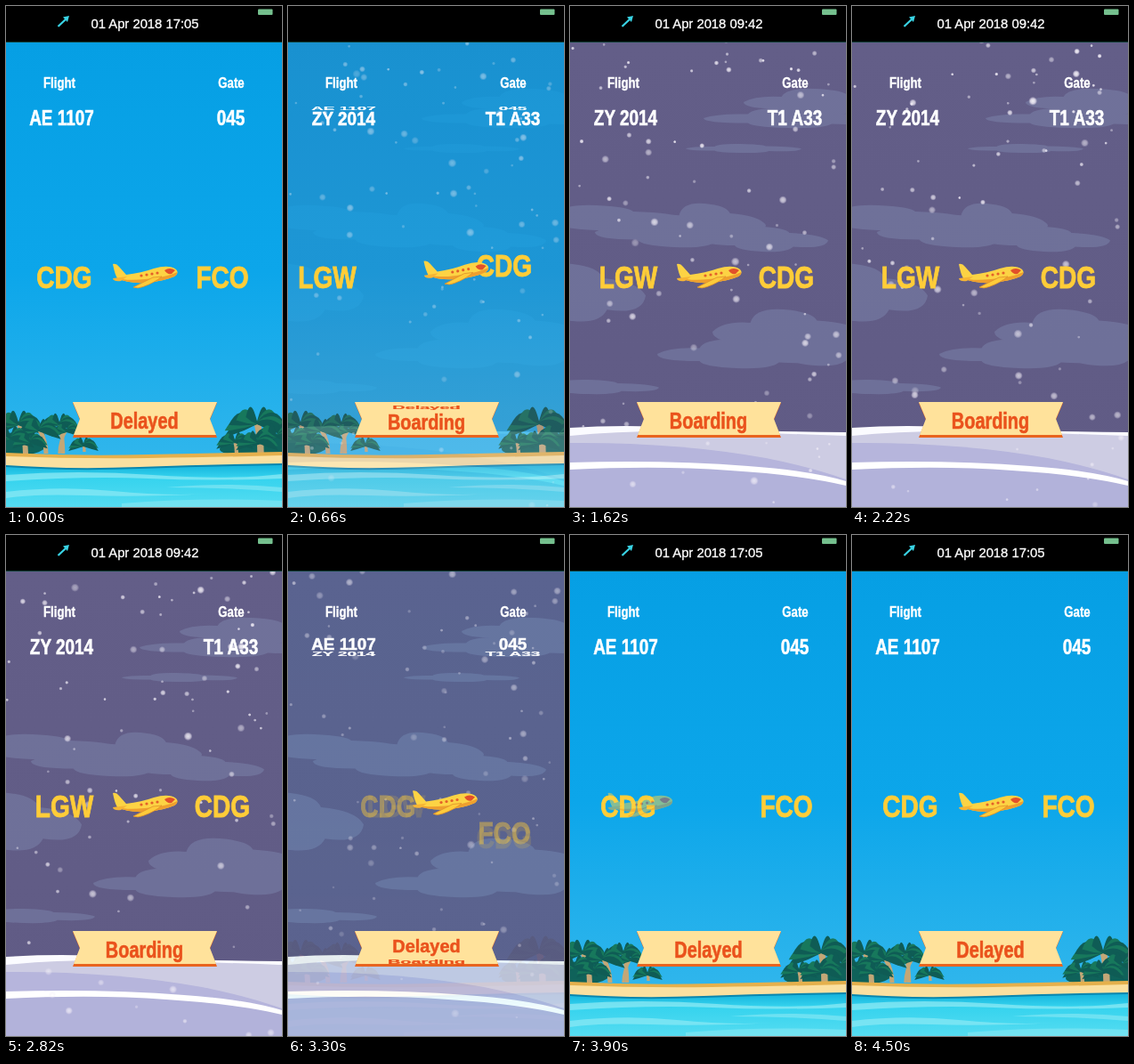
These frames come from a looping animation (310x563 px, 4560 ms). An HTML page:

```html
<!DOCTYPE html>
<html lang="en">
<head>
<meta charset="utf-8">
<title>Flight board</title>
<style>
  html, body { margin: 0; width: 100%; height: 100%; overflow: hidden; background: #000; }
  svg { display: block; width: 100%; height: 100%; }
  text { font-family: "Liberation Sans", Arial, sans-serif; font-weight: bold; text-anchor: middle; }
  .date text { font-size: 14.8px; font-weight: normal; fill: #fff; stroke: #fff; stroke-width: .35; }
</style>
</head>
<body>
<svg viewBox="0 0 310 563" preserveAspectRatio="none">
  <defs>
    <linearGradient id="day" x1="0" y1="0" x2="0" y2="1">
      <stop offset="0" stop-color="#069fe4"/>
      <stop offset=".55" stop-color="#0ca6ea"/>
      <stop offset="1" stop-color="#30b6ec"/>
    </linearGradient>
    <linearGradient id="dusk" x1="0" y1="0" x2="0" y2="1">
      <stop offset="0" stop-color="#635e88"/>
      <stop offset="1" stop-color="#605b85"/>
    </linearGradient>
    <linearGradient id="sea" x1="0" y1="0" x2="0" y2="1">
      <stop offset="0" stop-color="#15b4dd"/>
      <stop offset=".3" stop-color="#35d3ee"/>
      <stop offset="1" stop-color="#55dcf1"/>
    </linearGradient>
    <radialGradient id="flake">
      <stop offset="0" stop-color="#fff"/>
      <stop offset=".55" stop-color="#f4eef8" stop-opacity=".85"/>
      <stop offset="1" stop-color="#e8e4f4" stop-opacity="0"/>
    </radialGradient>
  </defs>

  <g id="beach">
    <rect y="40" width="310" height="470" fill="url(#day)"/>
    <g id="palms"></g>
    <path d="M0 502 Q80 506 160 504 T310 501 V525 H0Z" fill="#e5b04c"/>
    <path d="M0 506 Q80 509 160 508 T310 505 V525 H0Z" fill="#fbe0a0"/>
    <path d="M0 516 Q70 521 150 518 T310 514 V563 H0Z" fill="#0a86ae"/>
    <path d="M0 518 Q70 523 150 520 T310 516 V563 H0Z" fill="url(#sea)"/>
    <path d="M0 527 Q80 521 165 527 T310 526 V531 Q230 534 160 531 T0 534Z" fill="#8deaf5" opacity=".75"/>
    <path d="M0 546 Q60 539 120 545 T230 548 Q150 552 90 550 T0 553Z" fill="#8deaf5" opacity=".7"/>
    <path d="M180 541 Q250 535 310 541 V546 Q250 541 180 541Z" fill="#8deaf5" opacity=".6"/>
    <path d="M130 559 Q220 552 310 556 V563 H130Z" fill="#8deaf5" opacity=".55"/>
  </g>

  <g id="winter">
    <rect y="40" width="310" height="523" fill="url(#dusk)"/>
    <g id="clouds" fill="#8795bb" opacity=".36"></g>
    <path d="M0 474 Q60 470 130 474 T310 479 V563 H0Z" fill="#fbfbff"/>
    <path d="M0 483 Q50 478 110 478 T310 483 V563 H0Z" fill="#cdcce3"/>
    <path d="M0 491 Q120 490 220 508 Q270 518 310 532 V563 H0Z" fill="#b6b5dc"/>
    <path d="M0 513 Q110 510 200 517 Q270 522 310 534 V563 H0Z" fill="#fff"/>
    <path d="M0 521 Q100 516 180 522 Q260 527 310 539 V563 H0Z" fill="#b2b2da"/>
  </g>
  <g id="snow" fill="url(#flake)"></g>

  <rect width="310" height="41" fill="#12423a"/>
  <rect width="310" height="40" fill="#000"/>
  <rect x="283" y="3.500" width="16.5" height="6.500" rx="1" fill="#75c08e"/>
  <g id="date" class="date">
    <path d="M58.5 23 L67 15" stroke="#39d3e4" stroke-width="2.2" fill="none"/>
    <path d="M64 12.5 L71 11 L69 18Z" fill="#39d3e4"/>
    <text id="stamp" x="156" y="25"></text>
  </g>

  <path d="M75 446 H237 L229 465 L237 485 H75 L83 465Z" fill="#e8641f"/>
  <path d="M75 445 H237 L229 464 L236 482 H76 L83 464Z" fill="#ffe29b"/>

  <g id="labels"></g>

  <g id="plane">
    <path d="M-31 4 Q-34 -1 -36 -12 Q-32 -13 -29 -9 L-21 0 Q-4 -2 10 -7 Q27 -12 35 -6 Q39 -2 33 2 Q22 7 2 9 Q-20 10 -31 4Z" fill="#fcd344"/>
    <path d="M-31 4 Q-20 7 0 5 Q24 3 36.500 -3 Q36 1 33 2 Q22 7 2 9 Q-20 10 -31 4Z" fill="#ee9f2e"/>
    <path d="M-20 2 L-36 4 Q-35 8 -27 7Z" fill="#f6b535"/>
    <path d="M9 3 L-13 14 Q-8 16 -2 13.500 Q11 9 19 2Z" fill="#fdcb3b" stroke="#e0902a" stroke-width=".8"/>
    <path d="M22 -5 Q28 -9 34 -5 L30 -1 Q25 0 22 -5Z" fill="#e2502a"/>
    <g fill="#e4602a">
      <circle cx="-4" cy="1" r="1.600"/><circle cx="2" cy="0" r="1.600"/>
      <circle cx="8" cy="-1" r="1.600"/><circle cx="14" cy="-2" r="1.600"/>
    </g>
  </g>
</svg>

<script>
const LOOP = 4560, TO_WINTER = 355, TO_BEACH = 3060, RATE = 1.2 / 1000;
const PT = 310 / 375;      // layout points to stage pixels
const NARROW = 0.78;       // one condensed cut for all board lettering
const FLAKES = 90;
const STAMPS = ['01 Apr 2018 17:05', '01 Apr 2018 09:42'];

const $ = id => document.getElementById(id);
const clamp = v => Math.min(1, Math.max(0, v));
const span = (v, start, length) => clamp((v - start) / length);

function bezier(x1, y1, x2, y2) {
  const at = (a, b, s) => 3 * a * s * (1 - s) ** 2 + 3 * b * s * s * (1 - s) + s ** 3;
  return x => {
    if (x <= 0 || x >= 1) return clamp(x);
    let lo = 0, hi = 1;
    for (let i = 0; i < 22; i++) {
      const mid = (lo + hi) / 2;
      if (at(x1, x2, mid) < x) lo = mid; else hi = mid;
    }
    return at(y1, y2, (lo + hi) / 2);
  };
}
const easeIn = bezier(.42, 0, 1, 1);
const easeOut = bezier(0, 0, .58, 1);
const easeInOut = bezier(.42, 0, .58, 1);

let seed = 41;
const random = () => (seed = seed * 16807 % 2147483647) / 2147483647;

function add(parent, name, attrs) {
  const node = document.createElementNS('http://www.w3.org/2000/svg', name);
  for (const key in attrs) node.setAttribute(key, attrs[key]);
  return parent.appendChild(node);
}

// Scenery
function palm(x, y, r, base, lean) {
  const g = $('palms');
  if (base) add(g, 'path', {
    d: `M${x} ${y} Q${x + lean} ${(y + base) / 2} ${x + lean} ${base}`,
    stroke: '#c3a777', 'stroke-width': r / 5, fill: 'none'
  });
  for (let i = 0; i < 11; i++) {
    const a = Math.PI * (.95 + i * .11), c = Math.cos(a) * r, s = Math.sin(a) * r;
    const ex = x + c, ey = y + s * .55 + r * .38;
    add(g, 'path', {
      d: `M${x} ${y} Q${x + c * .6} ${y + s * .5 - r * .34} ${ex} ${ey}` +
         `Q${x + c * .5} ${y + s * .3 + r * .3} ${x} ${y + 3}Z`,
      fill: i % 2 ? '#17785c' : '#0f5c55'
    });
  }
}
function bush(x, y, w, h) {
  add($('palms'), 'ellipse', { cx: x, cy: y, rx: w, ry: h, fill: '#0f625a' });
}
bush(14, 492, 32, 13); bush(292, 493, 32, 13); bush(258, 498, 18, 6);
palm(60, 468, 23, 503, 4); palm(68, 476, 17, 503, -8);
palm(14, 468, 30, 503, 8); palm(37, 475, 25, 503, 8);
palm(5, 484, 27, 0, 0); palm(27, 488, 20, 0, 0); palm(87, 492, 17, 501, 1);
palm(282, 467, 37, 504, 4); palm(257, 488, 21, 503, 2);
palm(304, 482, 29, 0, 0); palm(282, 488, 24, 0, 0);

function cloud(x, y, w, h) {
  add($('clouds'), 'path', {
    d: `M${x} ${y} q${w * .08} ${-h * .5} ${w * .25} ${-h * .4}` +
       `q${w * .03} ${-h * .7} ${w * .22} ${-h * .6} t${w * .22} ${h * .5}` +
       `q${w * .25} ${h * .1} ${w * .31} ${h * .6} q${-w * .02} ${h * .7} ${-w * .28} ${h * .5}` +
       `q${-w * .05} ${h * .5} ${-w * .25} ${h * .4} t${-w * .22} ${-h * .5} Q${x} ${y + h * .5} ${x} ${y}Z`
  });
}
[[150, 126, 200, 11], [195, 108, 170, 15], [-60, 238, 190, 14], [28, 254, 190, 17],
 [90, 244, 130, 22], [150, 262, 140, 14], [-70, 322, 155, 32], [160, 366, 170, 25],
 [98, 391, 190, 16], [205, 382, 150, 22], [-50, 428, 150, 8], [130, 160, 130, 5]
].forEach(c => cloud(...c));

// Snow: every flake falls a whole number of times per loop
const flakes = Array.from({ length: FLAKES }, () => {
  const depth = random();
  return {
    x: random() * 330 - 20, phase: random(), falls: random() < .3 ? 2 : 1,
    drift: random() * 40 - 10, alpha: .45 + random() * .55,
    node: add($('snow'), 'circle', { r: 1.8 + depth * depth * 3.2 })
  };
});

// Board
function word(text, x, y, size, fill) {
  const node = add($('labels'), 'text', {
    'font-size': size, y: size * .358, fill, stroke: fill, 'stroke-width': size * .025
  });
  node.textContent = text;
  const put = (dx, dy, sy, alpha) => {
    node.setAttribute('transform', `translate(${x + dx} ${y + dy}) scale(${NARROW} ${sy})`);
    node.setAttribute('opacity', alpha);
  };
  put(0, 0, 1, 1);
  return put;
}
const pair = (a, b, ...style) => [word(a, ...style), word(b, ...style)];

word('Flight', 60, 86, 17, '#fff');
word('Gate', 253, 86, 17, '#fff');
const flips = [
  { words: pair('AE 1107', 'ZY 2014', 62.5, 125, 24.3, '#fff'), rise: 11 },
  { words: pair('045', 'T1 A33', 252.5, 125, 24.3, '#fff'), rise: 11 },
  { words: pair('Delayed', 'Boarding', 155.5, 466, 25.5, '#ea521c'), rise: 17 }
];
const slides = [
  { words: pair('CDG', 'LGW', 65.5, 304.5, 36, '#ffcd38'), dx: 80 * PT, dy: 0 },
  { words: pair('FCO', 'CDG', 243, 304.5, 36, '#ffcd38'), dx: 0, dy: 50 * PT }
];

function flip({ words, rise }, to, dir, s) {
  const p = easeOut(span(s, 0, .5));
  words[to](0, dir * rise * (1 - p), .1 + .9 * p, p > 0 ? 1 : 0);
  words[1 - to](0, -dir * rise * p, 1 - .9 * p, p < 1 ? 1 : 0);
}

function slide({ words, dx, dy }, to, dir, s) {
  const out = easeIn(span(s, 0, .32)), into = easeIn(span(s, .17, .25)), left = 1 - into;
  words[1 - to](-dir * dx * out, -dir * dy * out, 1, 1 - out);
  words[to](-dir * dx * left, -dir * dy * left, 1, clamp(into * 1.5));
}

function fly(s) {
  const u = easeInOut(span(s, 0, 1.5));
  let x = 156, y = 302, turn = 0, alpha;
  if (u < .515) {
    const roll = span(u, 0, .25), lift = span(u, .25, .25);
    x += PT * (80 * roll + 100 * lift);
    y -= PT * (10 * roll + 50 * lift);
    turn = -22.5 * span(u, .1, .4);
    alpha = 1 - lift;
  } else {
    alpha = span(u, .55, .45);
    x *= alpha;
  }
  $('plane').setAttribute('transform', `translate(${x} ${y}) rotate(${turn})`);
  $('plane').setAttribute('opacity', alpha);
}

function draw(now) {
  const t = now % LOOP;
  const to = t >= TO_WINTER && t < TO_BEACH ? 1 : 0;
  const s = (t - (to ? TO_WINTER : TO_BEACH) + LOOP) % LOOP * RATE;
  const dir = to ? 1 : -1;

  const fade = easeInOut(span(s, .13, .76)), drift = easeOut(span(s, 0, 1));
  $('winter').setAttribute('opacity', to ? fade : 1 - fade);
  $('snow').setAttribute('opacity', to ? drift : 1 - drift);
  for (const f of flakes) {
    const u = (t / LOOP * f.falls + f.phase) % 1;
    f.node.setAttribute('cx', f.x + f.drift * u);
    f.node.setAttribute('cy', 34 + 530 * (.5 * u + .5 * u * u));
    f.node.setAttribute('opacity', f.alpha * (1 - .35 * u));
  }

  flips.forEach(f => flip(f, to, dir, s));
  slides.forEach(l => slide(l, to, dir, s));
  fly(s);

  const h = easeInOut(span(s, 0, 1));
  const up = span(h, 0, .45) - span(h, .5, .45);
  $('date').setAttribute('transform', `translate(0 ${-100 * PT * up})`);
  $('stamp').textContent = STAMPS[s < .5 ? 1 - to : to];
}

const start = performance.now();
function tick() {
  draw(performance.now() - start);
  requestAnimationFrame(tick);
}
tick();
</script>
</body>
</html>
```
